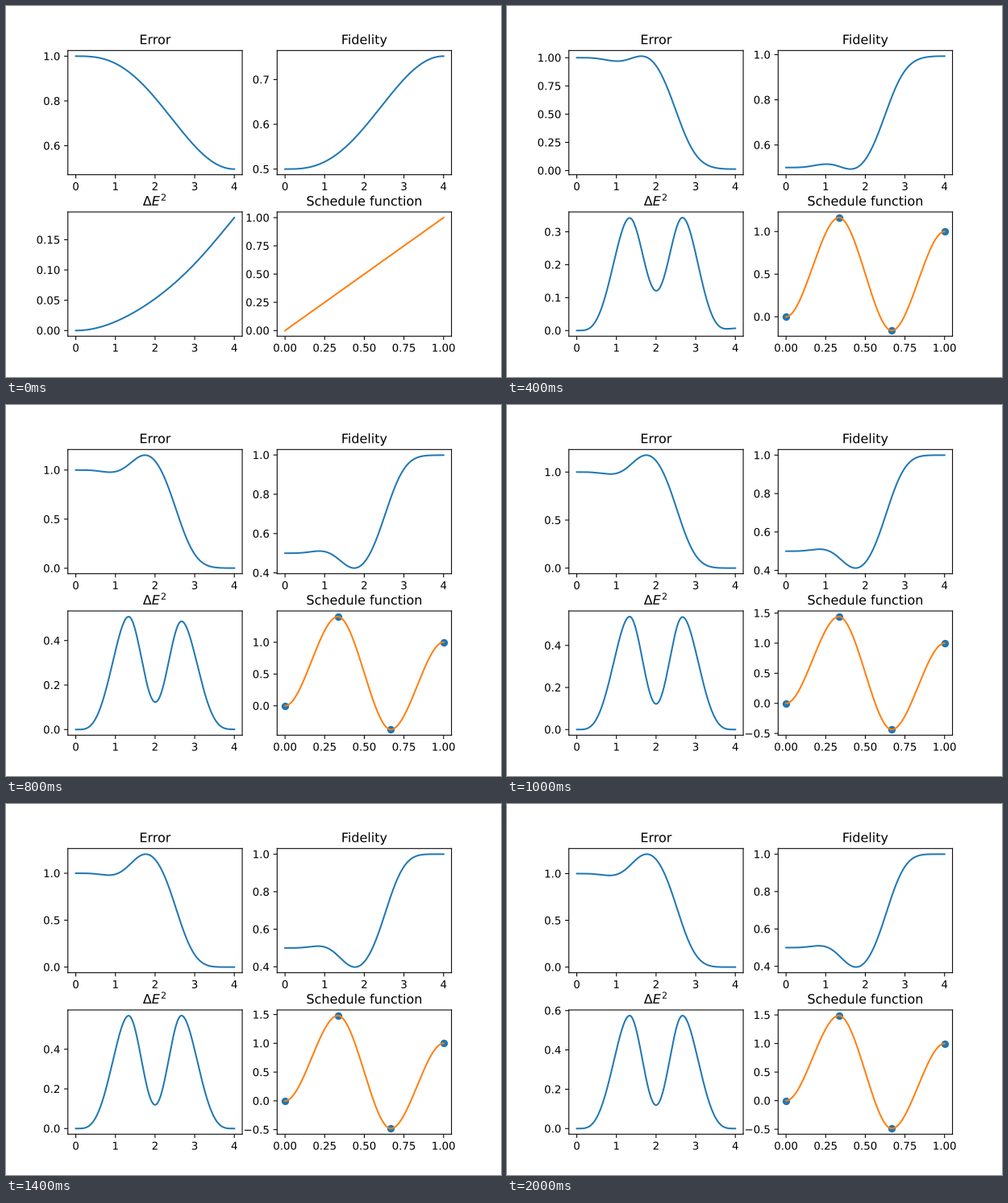
Recreate the animation shown at these times as a matplotlib script. Size 614 by 461 pixels, loop 2.2 s.

```python
import numpy as np
import matplotlib.pyplot as plt
from matplotlib import patheffects
from matplotlib.animation import FuncAnimation

DPI = 96
FRAMES = 11
T = 4.0          # total evolution time
STEPS = 400
PEAK = 1.4877    # best height of the first inner control point

# Smooth vector look: sub-pixel lines and unhinted outlined text
plt.rcParams["path.effects"] = [patheffects.Stroke(snap=False)]
plt.rcParams["text.hinting"] = "no_hinting"

times = np.linspace(0, T, STEPS + 1)


def control_points(k):
    """Schedule knots after k optimiser steps, closing in on the optimum."""
    gap = np.exp(-0.56 * k - 6.6e-5 * k ** 5)
    skew = 0.15 * np.exp(-(k - 4) ** 2)
    return np.array([0, PEAK - gap * (1 - skew), 1 - PEAK + gap * (1 + skew), 1])


def schedule(u, k):
    """Straight ramp at first, then cubic pieces flat at every knot."""
    if k == 0:
        return u
    knots = control_points(k)
    i = np.minimum((u * 3).astype(int), 2)
    v = u * 3 - i
    return knots[i] + (knots[i + 1] - knots[i]) * v * v * (3 - 2 * v)


def rate(n, s):
    """Precession of the Bloch vector under H = -((1-s) X + s Z) / 2."""
    x, y, z = n
    return np.array([-s * y, s * x - (1 - s) * z, (1 - s) * y])


def evolve(k):
    s = schedule(np.linspace(0, 1, 2 * STEPS + 1), k)
    h = T / STEPS
    path = [np.array([1.0, 0.0, 0.0])]
    for j in range(STEPS):
        n = path[-1]
        s0, s1, s2 = s[2 * j:2 * j + 3]
        a = rate(n, s0)
        b = rate(n + h / 2 * a, s1)
        c = rate(n + h / 2 * b, s1)
        d = rate(n + h * c, s2)
        path.append(n + h / 6 * (a + 2 * b + 2 * c + d))
    x, _, z = np.array(path).T
    s = s[::2]
    variance = ((1 - s) ** 2 + s ** 2 - ((1 - s) * x + s * z) ** 2) / 4
    return 1 - z, (1 + z) / 2, variance, s


runs = [evolve(k) for k in range(FRAMES)]

fig, axes = plt.subplots(2, 2, figsize=(614 / DPI, 461 / DPI), dpi=DPI)
fig.subplots_adjust(hspace=0.3)
titles = ["Error", "Fidelity", r"$\Delta E^2$", "Schedule function"]


def draw(k):
    for ax, title, data in zip(axes.flat, titles, runs[k]):
        ax.clear()
        ax.set_title(title)
        if title != titles[-1]:
            ax.plot(times, data, color="C0")
            continue
        if k > 0:
            ax.scatter(np.arange(4) / 3, control_points(k), color="C0")
        ax.plot(times / T, data, color="C1")


anim = FuncAnimation(fig, draw, frames=FRAMES, interval=200, repeat=True,
                     repeat_delay=0, init_func=lambda: draw(0))
plt.show()
```
